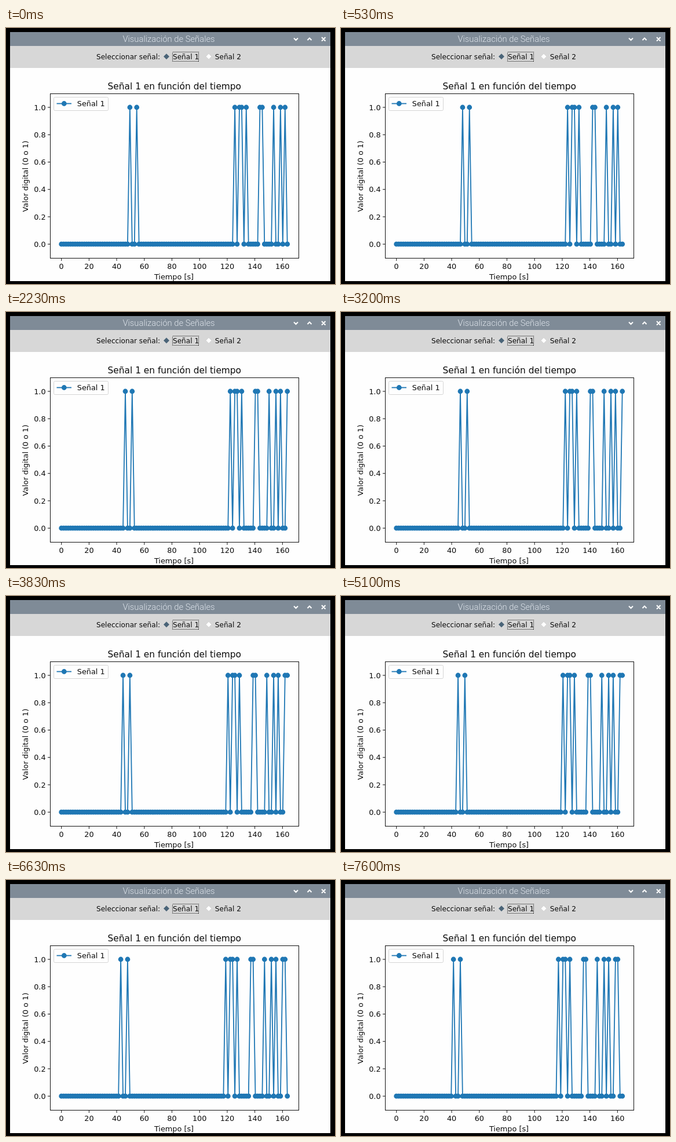
Animation of 568x442 px, one loop 8000 ms. Source, as an HTML page:

```html
<!DOCTYPE html>
<html lang="es">
<head>
<meta charset="utf-8">
<title>Visualización de Señales</title>
<style>
  html, body { margin: 0; width: 100%; height: 100%; overflow: hidden; background: #000; }
  svg { display: block; }
  text { font: 12.85px "DejaVu Sans", sans-serif; fill: #0c0c0c; }
  .mid { text-anchor: middle; }
  .end { text-anchor: end; }
  .ui text { font-size: 12.1px; }
  .crisp { shape-rendering: crispEdges; }
  .axis { fill: none; stroke: #111; }
  .line, .dots { fill: none; stroke: #1f77b4; }
  .line { stroke-width: 1.8; stroke-linejoin: round; }
  .dots { stroke-width: 8.8; stroke-linecap: round; }
  .buttons { fill: none; stroke: #fff; stroke-width: 2; }
</style>
</head>
<body>
<svg width="568" height="442" viewBox="0 0 568 442">
  <g class="crisp">
    <rect x="7" y="7" width="553" height="430" fill="#fefefe"/>
    <rect x="7" y="7" width="553" height="24" fill="#7f8b97"/>
    <rect x="7" y="31" width="553" height="38" fill="#d7d7d7"/>
  </g>

  <text class="mid" x="281" y="24" style="font:300 14.8px Roboto,sans-serif;fill:#dde3ea">Visualización de Señales</text>
  <path class="buttons" d="M497 17.5l3.5 3.5l3.5-3.5M520.5 21l3.5-3.5l3.5 3.5M545 16l6.5 6.5m0-6.5l-6.5 6.5"/>

  <g class="ui">
    <text x="156" y="53.7">Seleccionar señal:</text>
    <path d="M277 44.2l5 5l-5 5l-5-5z" fill="#4a6478"/>
    <text x="288" y="53.7">Señal 1</text>
    <rect class="axis crisp" x="287.5" y="41.5" width="45" height="16" stroke-dasharray="1 1"/>
    <path d="M350 44.2l5 5l-5 5l-5-5z" fill="#fefefe" stroke="#c4c4c4" stroke-width=".6"/>
    <text x="360.8" y="53.7">Señal 2</text>
  </g>

  <text class="mid" x="290.8" y="105.7" style="font-size:15.4px">Señal 1 en función del tiempo</text>
  <text class="mid" x="290" y="433.6">Tiempo [s]</text>
  <text class="mid" transform="translate(37.5 256) rotate(-90)">Valor digital (0 o 1)</text>

  <path class="line" id="line"/>
  <path class="dots" id="dots"/>
  <rect class="axis crisp" x="76.5" y="113.5" width="429" height="284"/>
  <g id="ticks"></g>

  <rect x="82.5" y="119.5" width="94" height="23" rx="2" fill="#fefefe" stroke="#d4d4d4"/>
  <path class="line" d="M87.5 130.5H113"/>
  <path class="dots" d="M100.3 130.5h0"/>
  <text x="122.8" y="134.9">Señal 1</text>
</svg>
<script>
const LOOP = 8000, COUNT = 100;
const X0 = 95.7, X1 = 485.7, Y0 = 373.2, Y1 = 137;
// Sample numbers where the signal is high
const high = new Set([30, 33, 76, 78, 79, 81, 87, 88, 93, 96, 98, 101, 102]);
// Moments at which a new sample arrives and the window moves on by one
const arrivals = [30, 1730, 3500, 5130, 6770];
const $ = id => document.getElementById(id);

let ticks = "";
for (let i = 0; i <= 8; i++) {
  const x = X0 + i * 47.7;
  ticks += `<path class="axis" d="M${x} 397.5v4.5"/><text class="mid" x="${x}" y="416">${i * 20}</text>`;
}
for (let i = 0; i <= 5; i++) {
  const y = Y0 + (Y1 - Y0) * i / 5;
  ticks += `<path class="axis" d="M76.5 ${y}h-4.5"/><text class="end" x="68.6" y="${y + 4.6}">${(i / 5).toFixed(1)}</text>`;
}
$("ticks").innerHTML = ticks;

function plot(shift) {
  const points = Array.from({ length: COUNT }, (_, i) =>
    `${X0 + (X1 - X0) * i / (COUNT - 1)} ${high.has(i + shift) ? Y1 : Y0}`);
  $("line").setAttribute("d", "M" + points.join("L"));
  $("dots").setAttribute("d", points.map(p => `M${p}h0`).join(""));
}

let shown = -1;
function frame() {
  const t = performance.now() % LOOP;
  const shift = arrivals.filter(a => a <= t).length;
  if (shift !== shown) plot(shown = shift);
  requestAnimationFrame(frame);
}
frame();
</script>
</body>
</html>
```
